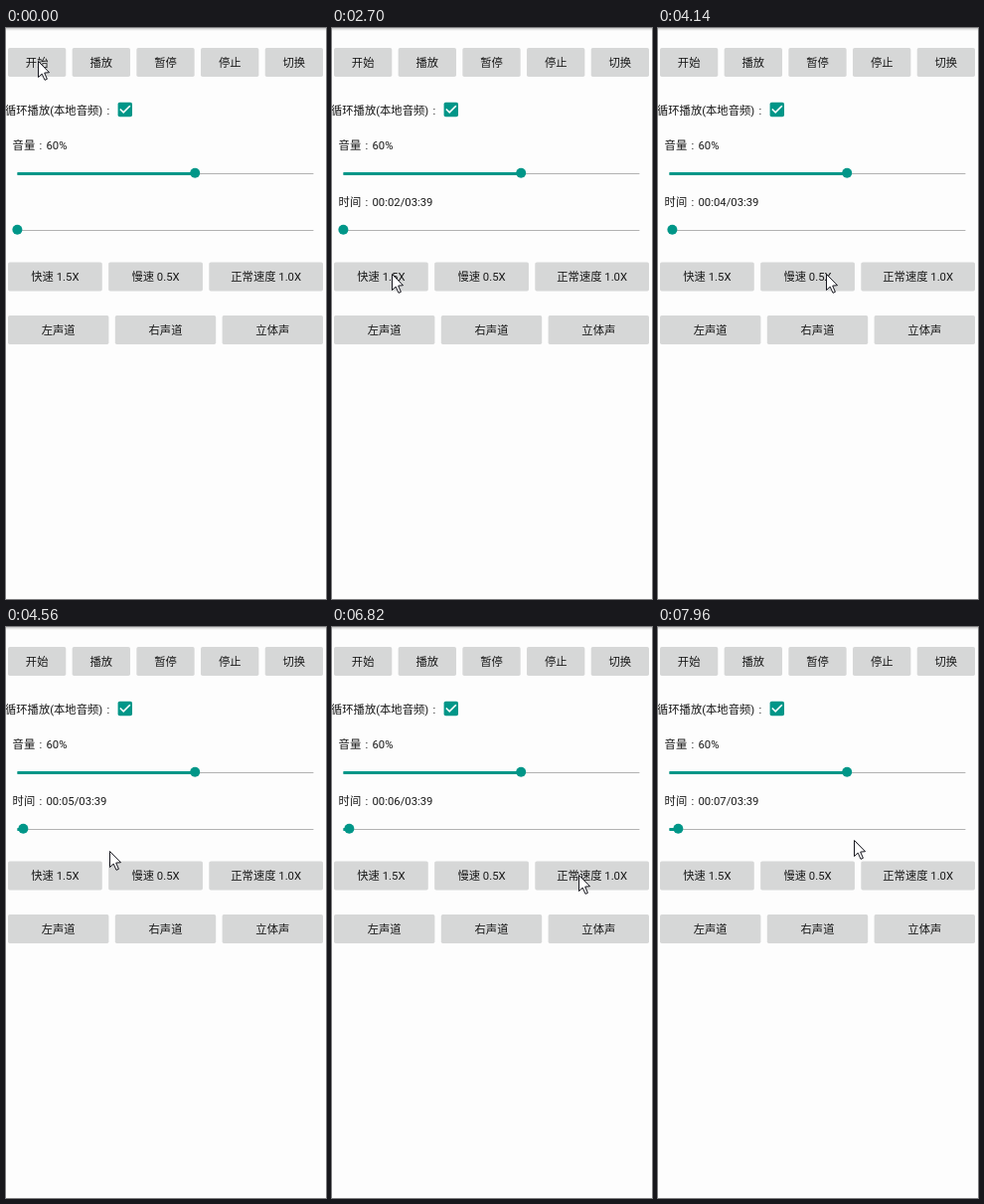
An HTML page with a canvas for the animation above (8 s loop, 322x574 px).

```html
<!DOCTYPE html>
<html lang="zh-CN">
<head>
<meta charset="utf-8">
<title>音频播放</title>
<style>
  html, body { margin: 0; width: 100%; height: 100%; overflow: hidden; background: #fdfdfd; }
  canvas { display: block; width: 322px; height: 574px; }
</style>
</head>
<body>
<canvas id="stage"></canvas>
<script>
const W = 322, H = 574, LOOP = 8000;
const TEAL = '#009688', BUTTON = '#d6d7d7', PRESSED = '#bcbdbd', INK = '#181818';
const SIZE = 11.3;
const FONT = `${SIZE}px Roboto, "Noto Sans CJK SC", "Noto Sans CJK", sans-serif`;
const TICK = 141.2, PHASE = 41;   // the pointer is sampled at this rate
const DURATION = 219;

const canvas = document.getElementById('stage');
const ctx = canvas.getContext('2d');
const ratio = window.devicePixelRatio || 1;
canvas.width = W * ratio;
canvas.height = H * ratio;

// Pointer stops: time, x, y
const PATH = [
  [1450, 32, 33], [1736, 67, 102], [2430, 52, 246], [3410, 179, 250], [3970, 179, 250],
  [4559, 104, 225], [4860, 59, 181], [5260, 59, 181], [5689, 64, 180], [5980, 59, 180],
  [6810, 248, 249], [7810, 248, 249], [7940, 197, 214]
];
// Playback position in seconds; the slope follows the chosen speed
const PLAYBACK = [[840, 0], [1800, 1], [3550, 4], [5500, 6], [7380, 7], [8000, 7.4]];

const ROWS = [
  { y: 20, labels: ['开始', '播放', '暂停', '停止', '切换'] },
  { y: 235.4, labels: ['快速 1.5X', '慢速 0.5X', '正常速度 1.0X'], lastWeight: 1.21 },
  { y: 289, labels: ['左声道', '右声道', '立体声'] }
];
const PRESSES = { '慢速 0.5X': [3830, 4120], '正常速度 1.0X': [6980, 7100] };

// Index of the segment holding t, and how far through it t is.
function locate(keys, t) {
  let i = 0;
  while (i < keys.length - 2 && t >= keys[i + 1][0]) i++;
  const span = keys[i + 1][0] - keys[i][0];
  return [i, Math.min(1, Math.max(0, (t - keys[i][0]) / span)), span];
}

function linear(keys, t) {
  const [i, u] = locate(keys, t);
  return keys[i][1] + (keys[i + 1][1] - keys[i][1]) * u;
}

// Smooth curve through the keys that comes to rest at turning points.
function smooth(keys, t, axis) {
  const slope = i => keys[i] && keys[i + 1]
    ? (keys[i + 1][axis] - keys[i][axis]) / (keys[i + 1][0] - keys[i][0]) : 0;
  const tangent = i => {
    const a = slope(i - 1), b = slope(i);
    return a * b > 0 ? 2 * a * b / (a + b) : 0;
  };
  const [i, u, span] = locate(keys, t);
  const ease = u * u * (3 - 2 * u);
  return keys[i][axis] * (1 - ease) + keys[i + 1][axis] * ease
    + span * u * (1 - u) * (tangent(i) * (1 - u) - tangent(i + 1) * u);
}

function box(x, y, w, h, r, color) {
  ctx.fillStyle = color;
  ctx.beginPath();
  ctx.roundRect(x, y, w, h, r);
  ctx.fill();
}

function text(str, x, y, align = 'left') {
  ctx.fillStyle = INK;
  ctx.textAlign = align;
  ctx.fillText(str, x, y);
}

// Name, then a colon centred in one full-width cell, then the value.
function field(name, value, x, y) {
  text(name, x, y);
  const end = x + ctx.measureText(name).width;
  text(':', end + SIZE / 2, y, 'center');
  text(value, end + SIZE, y);
}

function buttonRow({ y, labels, lastWeight = 1 }, t) {
  const left = 2, width = 317, gap = 6.4, n = labels.length;
  const unit = (width - gap * (n - 1)) / (n - 1 + lastWeight);
  labels.forEach((label, i) => {
    const x = left + i * (unit + gap);
    const w = i === n - 1 ? unit * lastWeight : unit;
    const [down, up] = PRESSES[label] || [];
    box(x, y, w, 29, 1.7, t >= down && t < up ? PRESSED : BUTTON);
    text(label, x + w / 2, Math.round(y + 19), 'center');
  });
}

function slider(y, share) {
  const left = 11.4, span = 298, x = left + span * share;
  ctx.fillStyle = '#b2b2b2';
  ctx.fillRect(left, y, span, 1);
  ctx.fillStyle = TEAL;
  ctx.fillRect(left, y - 1, x - left, 3);
  ctx.beginPath();
  ctx.arc(x, y - 0.3, 5, 0, Math.PI * 2);
  ctx.fill();
}

function trace(points) {
  ctx.beginPath();
  points.forEach(([x, y]) => ctx.lineTo(x, y));
}

function checkbox() {
  box(112.6, 74.8, 14.4, 14.4, 1.8, TEAL);
  ctx.strokeStyle = '#fff';
  ctx.lineWidth = 1.6;
  trace([[114.8, 81.5], [118.2, 84.9], [124.8, 78.3]]);
  ctx.stroke();
}

function pointer(x, y) {
  ctx.save();
  ctx.translate(Math.round(x) + 0.5, Math.round(y) + 0.5);
  trace([[0, 0], [0, 16], [3.7, 12.6], [6.5, 18.8], [8.9, 17.8], [6.2, 11.6], [11, 11.2]]);
  ctx.closePath();
  ctx.fillStyle = '#fff';
  ctx.fill();
  ctx.strokeStyle = '#17171f';
  ctx.lineWidth = 1;
  ctx.stroke();
  ctx.restore();
}

function stamp(s) {
  const two = n => String(n).padStart(2, '0');
  return two(Math.floor(s / 60)) + ':' + two(s % 60);
}

function draw(t) {
  ctx.setTransform(ratio, 0, 0, ratio, 0, 0);
  ctx.font = FONT;
  ctx.fillStyle = '#fdfdfd';
  ctx.fillRect(0, 0, W, H);
  ['#cfcfcf', '#e6e6e6', '#f6f6f6'].forEach((color, i) => {
    ctx.fillStyle = color;
    ctx.fillRect(0, i, W, 1);
  });

  ROWS.forEach(row => buttonRow(row, t));
  field('循环播放(本地音频)', '', -1, 86.5);
  checkbox();
  field('音量', '60%', 6.6, 122);
  slider(146, 0.6);

  const seconds = Math.floor(linear(PLAYBACK, t));
  if (t >= PLAYBACK[0][0]) field('时间', stamp(seconds) + '/' + stamp(DURATION), 6.6, 179);
  slider(203, Math.floor(seconds / DURATION * 100) / 100);

  const sampled = Math.floor((t - PHASE) / TICK) * TICK + PHASE;
  pointer(smooth(PATH, sampled, 1), smooth(PATH, sampled, 2));
}

const start = performance.now();
function frame() {
  draw((performance.now() - start) % LOOP);
  requestAnimationFrame(frame);
}
frame();
</script>
</body>
</html>
```
